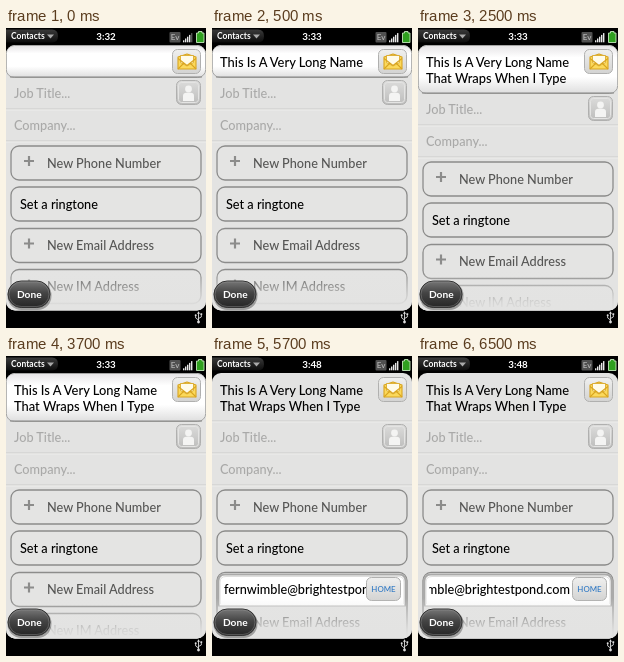
Write an HTML page that moves like this. It is 200 px wide and 300 px high and loops after 8 s.

```html
<!DOCTYPE html>
<html lang="en">
<head>
<meta charset="utf-8">
<title>Contact form</title>
<style>
html, body { margin: 0; width: 100%; height: 100%; overflow: hidden; background: #000; }
svg { display: block; width: 100vw; height: 100vh; }
text { font: 500 12.7px Lato, "Open Sans", sans-serif; white-space: pre; }
.name { font-size: 12.9px; }
.hint { fill: #a9a9a8; }
.new { fill: #555554; }
.bold { font-weight: 700; fill: #fff; }
</style>
</head>
<body>
<svg id="stage" viewBox="0 0 200 300">
  <defs>
    <linearGradient id="fade" x2="0" y2="1">
      <stop stop-color="#e3e3e2" stop-opacity="0"/>
      <stop offset=".75" stop-color="#e3e3e2" stop-opacity=".88"/>
      <stop offset="1" stop-color="#e3e3e2"/>
    </linearGradient>
    <linearGradient id="focus" x2="0" y2="1">
      <stop stop-color="#e6e4e6"/><stop offset=".25" stop-color="#fff"/>
      <stop offset=".65" stop-color="#fff"/><stop offset="1" stop-color="#dedede"/>
    </linearGradient>
    <linearGradient id="button" x2="0" y2="1">
      <stop stop-color="#f0f0ef"/><stop offset="1" stop-color="#d3d3d2"/>
    </linearGradient>
    <linearGradient id="plate" x2="0" y2="1">
      <stop stop-color="#dcdcdb"/><stop offset="1" stop-color="#bdbdbc"/>
    </linearGradient>
    <linearGradient id="dark" x2="0" y2="1">
      <stop stop-color="#777"/><stop offset=".45" stop-color="#444"/>
      <stop offset="1" stop-color="#262626"/>
    </linearGradient>
    <linearGradient id="tab" x2="0" y2="1">
      <stop stop-color="#3a3a3a"/><stop offset="1" stop-color="#0c0c0c"/>
    </linearGradient>
    <clipPath id="page"><rect y="17" width="200" height="265.500" rx="9"/></clipPath>
    <clipPath id="field"><rect x="11" y="219" width="143" height="30"/></clipPath>
  </defs>

  <rect width="200" height="300"/>
  <path d="M0 1.500H46Q52 1.500 52 8T46 14.500H0Z" fill="url(#tab)"/>
  <text class="bold" x="5" y="11.300" style="font-size:8.500px">Contacts</text>
  <path d="M41 6.500h7l-3.500 4z" fill="#aaa"/>
  <text class="bold" id="clock" x="100" y="12.200" text-anchor="middle" style="font-size:9.800px"></text>
  <rect x="163.500" y="4" width="11" height="10.500" rx="1" fill="#505050"/>
  <text x="169" y="12.200" text-anchor="middle" style="font-size:8px" fill="#bbb">Ev</text>
  <g id="bars"></g>
  <path d="M190.500 5h2v-1.500h3.500v1.500h2v9.500h-7.500z" fill="#2fa01f" stroke="#c4e8bb" stroke-width=".9"/>

  <g clip-path="url(#page)">
    <rect y="17" width="200" height="266" fill="#e3e3e2"/>
    <g id="form"></g>
    <rect y="242" width="200" height="42" fill="url(#fade)"/>
  </g>

  <rect x="1.500" y="253.500" width="44" height="28.500" rx="14" opacity=".3"/>
  <rect x="2" y="253" width="42" height="26.500" rx="13.250" fill="url(#dark)" stroke="#333"/>
  <rect x="3" y="254" width="40" height="24.500" rx="12.250" fill="none" stroke="#999" stroke-width=".6" opacity=".7"/>
  <text class="bold" x="23.300" y="270" text-anchor="middle" style="font-size:10.200px">Done</text>

  <g fill="none" stroke="#ddd" stroke-width=".9">
    <path d="M192.500 285v8.500M192.500 292l-2.800-2v-2.500M192.500 290.500l2.800-1.500v-2.500"/>
    <g fill="#ddd" stroke="none">
      <circle cx="192.500" cy="294" r="1.400"/><circle cx="189.700" cy="287.300" r="1"/>
      <path d="M194.400 285.300h1.800v1.800h-1.800zM192.500 283.200l1.500 2.500h-3z"/>
    </g>
  </g>
</svg>
<script>
const LOOP = 8000;
const EMAIL = "fernwimble@brightestpond.com";
const LINES = ["This Is A Very Long Name", "That Wraps When I Type"];
const STATES = [
  { at: 0, clock: "3:32", bars: 4, lines: 0, focus: "name" },
  { at: 500, clock: "3:33", bars: 5, lines: 1, focus: "name" },
  { at: 2500, clock: "3:33", bars: 5, lines: 2, focus: "name" },
  { at: 4500, clock: "3:48", bars: 5, lines: 2, focus: "email" },
  { at: 6500, clock: "3:48", bars: 5, lines: 2, focus: "email", scrolled: true }
];
const el = id => document.getElementById(id);

const label = (x, y, str, cls = "") => `<text x="${x}" y="${y}" class="${cls}">${str}</text>`;

const rule = y => `<path d="M0 ${y}H200" stroke="#cacac9"/>
  <path d="M0 ${y + 1}H200" stroke="#eeeeed"/>`;

const box = (y, h = 34) => `<rect x="5" y="${y}" width="190" height="${h}" rx="8"
  fill="#e4e4e3" stroke="#8c8c8b" stroke-width="1.3"/>`;

const plus = y => `<path d="M18 ${y}h10M23 ${y - 5}v10" stroke="#8c8c8b" stroke-width="2.2"/>`;

const addRow = (y, str) => box(y) + plus(y + 15) + label(41, y + 21.8, str, "new");

const tile = (x, y, w, h, fill = "button") => `<rect x="${x}" y="${y}" width="${w}" height="${h}"
  rx="5" fill="url(#${fill})" stroke="#b0b0af"/>`;

function header(s) {
  const bottom = s.lines > 1 ? 65 : 49;
  const back = s.focus === "name"
    ? `<rect x=".3" y="17.500" width="199.400" height="${bottom - 17}" rx="8" fill="url(#focus)"
        stroke="#a5a5a4"/>
       <path d="M4 ${bottom}H196" stroke="#858584"/>`
    : rule(bottom);
  const name = LINES.slice(0, s.lines).map((str, i) => label(8, 38.5 + i * 16, str, "name")).join("");
  const mail = tile(166.5, 21.5, 28, 24) + `
    <g stroke="#d9a520" stroke-width="1.100" stroke-linejoin="round">
      <path d="M172 29l9-3 9 3v12h-18z" fill="#fbd95c"/>
      <path d="M174.500 27.500h13v7l-6.500 3.500-6.500-3.500z" fill="#fffbe8" stroke-width=".8"/>
      <path d="M172 30.500l9 7 9-7M172 41l6-6M190 41l-6-6" fill="none"/>
    </g>`;
  return back + name + mail;
}

function details() {
  const avatar = tile(170.5, 52.5, 24, 24, "plate") + `
    <rect x="172.500" y="54.500" width="20" height="20" rx="3" fill="none" stroke="#e4e4e3"/>
    <g fill="#f4f4f3">
      <circle cx="182.500" cy="61" r="3.400"/>
      <path d="M177 73v-5q0-3.200 3.500-3.200h4q3.500 0 3.500 3.200v5z"/>
    </g>`;
  return label(8, 70.2, "Job Title...", "hint") + avatar + rule(81)
    + label(8, 102.2, "Company...", "hint") + rule(113)
    + addRow(118, "New Phone Number")
    + box(159) + label(14, 181, "Set a ringtone");
}

function emailRow(s) {
  const place = s.scrolled ? 'x="152" text-anchor="end"' : 'x="12"';
  return box(216.5, 80) + `
    <path d="M6 250V225q0-7.500 7-7.500H187q7 0 7 7.500V250z" fill="#fff"/>
    <path d="M6.500 250V225q0-6.500 6.500-6.500H187q6.500 0 6.500 6.500V250" fill="none" stroke="#a9a9a8" stroke-width="2"/>
    <path d="M8 248V226q0-5.500 6-5.500H186q6 0 6 5.500V248" fill="none" stroke="#dededd"/>
    <path d="M6 250H194" stroke="#b8b8b7"/>
    <g clip-path="url(#field)"><text ${place} y="238">${EMAIL}</text></g>`
    + tile(154.5, 221.5, 34, 23)
    + `<text x="171.500" y="236" text-anchor="middle" fill="#2f78c4" style="font-size:7.900px">HOME</text>`
    + plus(265) + label(41, 270.5, "New Email Address", "new");
}

function draw(s) {
  el("clock").textContent = s.clock;
  el("bars").innerHTML = [0, 1, 2, 3, 4].map(i =>
    `<rect x="${177 + i * 2}" y="${12.3 - i * 1.8}" width="1.400" height="${2 + i * 1.8}"
      fill="${i < s.bars ? "#e8e8e8" : "#555"}"/>`).join("");
  const shift = s.lines > 1 ? 16 : 0;
  const rows = s.focus === "email" ? emailRow(s)
    : addRow(200.5 + shift, "New Email Address") + addRow(241.5 + shift, "New IM Address");
  el("form").innerHTML = `<g transform="translate(0 ${shift})">${details()}</g>` + rows + header(s);
}

let shown;
function tick(now) {
  const t = now % LOOP;
  const state = STATES.findLast(s => t >= s.at) || STATES[0];
  if (state !== shown) draw(shown = state);
  requestAnimationFrame(tick);
}
tick(performance.now());
</script>
</body>
</html>
```
